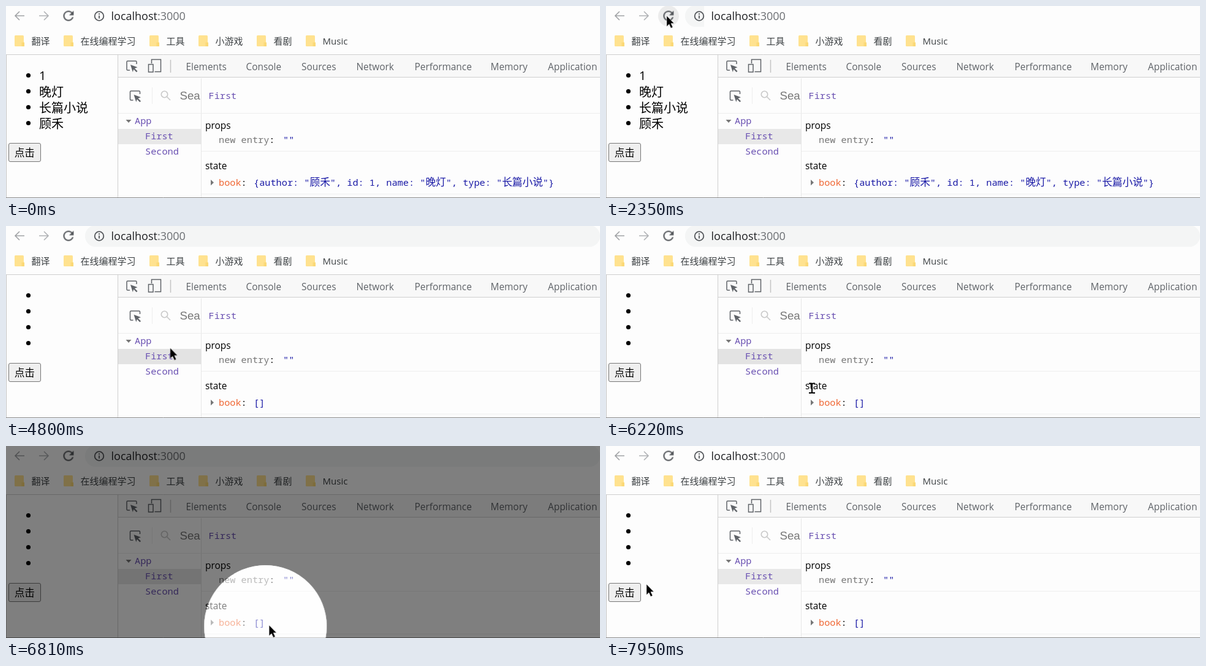
An HTML page for the animation above (8 s loop, 969x314 px).

```html
<!DOCTYPE html>
<html lang="zh-CN">
<head>
<meta charset="utf-8">
<title>State after reload</title>
<style>
html, body { margin: 0; width: 100%; height: 100%; overflow: hidden; background: #fdfdfd; }
svg { display: block; width: 969px; height: 314px; }
text { font-family: "Open Sans", "Noto Sans CJK SC", "Noto Sans CJK", sans-serif; white-space: pre; }
.url { font-size: 18px; fill: #202124; }
.dim { fill: #6b6e72; }
.marks { font-size: 15px; fill: #3c4043; }
.page { font-size: 20px; }
.tabs { font-size: 15.4px; fill: #5f6368; }
.head { font-size: 15.4px; }
.mono text { font-family: "Noto Sans Mono", "Noto Sans CJK SC", "Noto Sans CJK", monospace; font-size: 15.25px; }
.cjk { font-size: 16.67px; }
.tag { fill: #6a51b2; }
.key { fill: #ef6632; }
.val { fill: #1a1aa6; }
.line { fill: none; stroke-linecap: butt; }

.anim, .step { animation: 8s linear infinite; }
.step { animation-timing-function: step-end; }

#pill { animation-name: pill; }
@keyframes pill {
  0%, 88%, 100% { clip-path: inset(0 100% 0 0); }
  2% { clip-path: inset(0 809px 0 0); }
  34.625% { clip-path: inset(0 0 0 0); }
}
#hover { animation-name: hover; }
@keyframes hover {
  0%, 56.75%, 100% { opacity: 0; }
  2.875% { opacity: .5; }
  5.5% { opacity: 1; }
}
#tip { animation-name: tip; }
@keyframes tip {
  0%, 29.375%, 100% { opacity: 0; }
  9.25% { opacity: 1; }
}
#reload { animation-name: reload; }
@keyframes reload {
  0%, 54.375%, 100% { opacity: 1; }
  34.625% { opacity: 0; }
}
#stop { animation-name: stop; }
@keyframes stop {
  0%, 54.375%, 100% { opacity: 0; }
  34.625% { opacity: 1; }
  40.875% { opacity: .4; }
}
#items { animation-name: items; }
@keyframes items {
  0%, 100% { opacity: 1; }
  35%, 99.999% { opacity: 0; }
}
#full { animation-name: full; }
@keyframes full {
  0%, 100% { opacity: 1; }
  36.5%, 99.999% { opacity: 0; }
}
#empty { animation-name: empty; }
@keyframes empty {
  0%, 100% { opacity: 0; }
  36.5%, 99.999% { opacity: 1; }
}
#row { animation-name: row; }
@keyframes row {
  0%, 84%, 100% { fill: #e8e8e8; }
  59.5% { fill: #e3e3e3; }
}

.follow { animation-name: path; }
@keyframes path {
  0%, 2% { transform: translate(147px, 6px); }
  2.875%, 56.75% { transform: translate(99px, 16px); }
  58.25% { transform: translate(165px, 85px); }
  60% { transform: translate(267px, 199px); }
  62% { transform: translate(385px, 250px); }
  65%, 78.125% { transform: translate(336px, 265px); }
  84.75% { transform: translate(423px, 295px); }
  85.125% { transform: translate(429px, 293px); }
  87.625%, 88% { transform: translate(455px, 286px); }
  92.25% { transform: translate(328.500px, 282px); }
  92.625% { transform: translate(319.500px, 278px); }
  96.5%, 99.37% { transform: translate(84px, 236px); }
  99.375%, 100% { transform: translate(66px, 226px); }
}
#arrow { animation-name: arrow; }
@keyframes arrow {
  0%, 65%, 100% { opacity: 0; }
  2%, 78.5% { opacity: 1; }
}
#beam { animation-name: beam; }
@keyframes beam {
  0%, 78.5%, 100% { opacity: 0; }
  65% { opacity: 1; }
}

/* the spotlight trails the pointer by 30 ms */
#trail { animation-delay: -7970ms; }
#spot { animation-name: fade; }
@keyframes fade {
  0%, 78.125%, 96.875%, 100% { opacity: 0; }
  84%, 91.42% { opacity: .5; }
}
#lit { fill: #fff; animation-name: lit; }
@keyframes lit {
  0%, 78.125%, 96.875%, 100% { r: 900px; }
  84%, 91.42% { r: 100px; }
}
#dark { fill: none; stroke: #000; stroke-width: 3000px; animation-name: dark; }
@keyframes dark {
  0%, 78.125%, 96.875%, 100% { r: 2400px; }
  84%, 91.42% { r: 1600px; }
}
</style>
</head>
<body>
<svg viewBox="0 0 969 314">
  <defs>
    <g id="folder">
      <rect width="15" height="18" rx="1.5" fill="#ffe28f"/>
      <path d="M11.500 11.500h4.500v6.500h-4.500z" fill="#fbd977"/>
    </g>
    <g id="pick">
      <path class="line" d="M6 16H2.500Q1 16 1 14.500V2.500Q1 1 2.500 1H15.500Q17 1 17 2.500V6" stroke="#5f6368" stroke-width="1.5"/>
      <path d="M7 7l11.500 4.300-4.600 1.700 4.600 4.500-1.700 1.700-4.500-4.600-1.500 4.400z" fill="#5f6368"/>
    </g>
    <clipPath id="field"><rect x="183" y="118" width="134.500" height="57"/></clipPath>
  </defs>
  <rect width="969" height="314" fill="#fdfdfd"/>

  <!-- toolbar -->
  <rect id="pill" class="step" x="129" y="-1" width="840" height="35" rx="17" fill="#f4f5f5"/>
  <g class="line" stroke-width="1.6">
    <path d="M30 16H15M22 9l-7 7 7 7" stroke="#a0a2a5"/>
    <path d="M54 16h15M62 9l7 7-7 7" stroke="#b0b2b5"/>
  </g>
  <circle id="hover" class="step" cx="102" cy="16.500" r="17" fill="#ececec"/>
  <g id="reload" class="step">
    <path transform="translate(89.200 3.400) scale(1.06)" fill="#55585c" d="M17.650 6.350C16.200 4.900 14.210 4 12 4c-4.420 0-7.990 3.580-7.990 8s3.570 8 7.990 8c3.730 0 6.840-2.550 7.730-6h-2.080c-.82 2.330-3.040 4-5.650 4-3.310 0-6-2.690-6-6s2.690-6 6-6c1.660 0 3.140.69 4.220 1.780L13 11h7V4z"/>
  </g>
  <path id="stop" class="line step" d="M95.500 9.500l13 13m0-13l-13 13" stroke="#55585c" stroke-width="2"/>
  <circle class="line" cx="152" cy="16.500" r="7.300" stroke="#55585c" stroke-width="1.8"/>
  <path class="line" d="M152 12v2m0 1.500v5" stroke="#55585c" stroke-width="1.8"/>
  <text class="url" x="171.500" y="22.500">localhost<tspan class="dim">:3000</tspan></text>

  <!-- bookmarks -->
  <use href="#folder" x="14" y="48"/><use href="#folder" x="94" y="48"/>
  <use href="#folder" x="234" y="48"/><use href="#folder" x="314" y="48"/>
  <use href="#folder" x="409" y="48"/><use href="#folder" x="489" y="48"/>
  <g class="marks">
    <text x="41.500" y="63">翻译</text>
    <text x="121.500" y="63">在线编程学习</text>
    <text x="261.500" y="63">工具</text>
    <text x="341.500" y="63">小游戏</text>
    <text x="436.500" y="63">看剧</text>
    <text x="516.500" y="63">Music</text>
  </g>

  <!-- page -->
  <circle cx="36.500" cy="113.500" r="3.600"/><circle cx="36.500" cy="139.500" r="3.600"/>
  <circle cx="36.500" cy="165.500" r="3.600"/><circle cx="36.500" cy="191.500" r="3.600"/>
  <g id="items" class="page step">
    <text x="54" y="121">1</text>
    <text x="54" y="147.500">晚灯</text>
    <text x="54" y="173.500">长篇小说</text>
    <text x="54" y="199.500">顾禾</text>
  </g>
  <rect x="4.500" y="224.500" width="52" height="30" rx="2.500" fill="#efefef" stroke="#767676"/>
  <text class="cjk" x="13.700" y="246">点击</text>

  <!-- developer tools -->
  <rect x="183" y="80" width="786" height="37" fill="#f8f8f8"/>
  <g class="line">
    <path d="M0 79.500h969M183 116.500h786M182.500 80v233" stroke="#cfcfcf"/>
    <path d="M268.500 88v21" stroke="#c4c4c4" stroke-width="1.500"/>
    <path d="M318.500 118v195" stroke="#e6e6e6"/>
    <path d="M183 175.500h786M319 237.500h650M319 307.500h650M238.500 133v27" stroke="#eee"/>
    <path d="M.500 80v234" stroke="#c4c4c4"/>
    <path d="M0 313.500h969" stroke="#8a8a8a"/>
    <path d="M237.500 94v-6.500h15v20h-10M232.500 95.500h7.500v12.500h-7.500z" stroke="#5f6368" stroke-width="1.5"/>
    <g stroke="#c8c8c8" stroke-width="1.6">
      <circle cx="258.500" cy="144.500" r="5.200"/>
      <path d="M262.500 148.500l5.500 5.500"/>
    </g>
  </g>
  <use href="#pick" x="196" y="89"/>
  <use href="#pick" x="201.500" y="138"/>
  <g class="tabs">
    <text x="293.500" y="105">Elements</text>
    <text x="391.500" y="105">Console</text>
    <text x="482" y="105">Sources</text>
    <text x="571.500" y="105">Network</text>
    <text x="666.500" y="105">Performance</text>
    <text x="790.500" y="105">Memory</text>
    <text x="884" y="105">Application</text>
  </g>
  <g clip-path="url(#field)">
    <text x="283.500" y="153" style="font: 18.700px 'Liberation Sans', sans-serif" fill="#777">Sea</text>
  </g>
  <rect id="row" class="step" x="183" y="201" width="135" height="25" fill="#e8e8e8"/>
  <path d="M195.500 186h9l-4.500 5z" fill="#777"/>
  <path d="M334 284v9.500l5-4.750z" fill="#777"/>
  <text class="head" x="325" y="201">props</text>
  <text class="head" x="325" y="267">state</text>
  <g class="mono">
    <g class="tag">
      <text x="330.500" y="152">First</text>
      <text x="210" y="193">App</text>
      <text x="227" y="218">First</text>
      <text x="227" y="243">Second</text>
    </g>
    <text x="347" y="224" fill="#777">new entry<tspan fill="#000">:</tspan></text>
    <text class="val" x="452" y="224">""</text>
    <text class="key" x="347" y="294">book<tspan fill="#000">:</tspan></text>
    <g class="val">
      <text id="full" class="step" x="404" y="294">{author: "<tspan class="cjk">顾禾</tspan>", id: 1, name: "<tspan class="cjk">晚灯</tspan>", type: "<tspan class="cjk">长篇小说</tspan>"}</text>
      <text id="empty" class="step" x="404" y="294">[]</text>
    </g>
  </g>

  <g id="tip" class="step">
    <rect x="111.500" y="34.500" width="275" height="31" fill="#fff" stroke="#c4c4c4"/>
    <text x="121" y="55.500" font-size="15" fill="#575757">重新加载此页，按住即可查看更多选项</text>
  </g>

  <!-- pointer and spotlight -->
  <g id="spot" class="anim">
    <g id="trail" class="anim follow">
      <circle id="dark" class="anim" r="2400"/>
      <circle id="lit" class="anim" r="900"/>
    </g>
  </g>
  <g class="anim follow">
    <path id="arrow" class="step" d="M0 0V17.500l4-3.700 2.900 6.400 3.100-1.400-2.900-6.200h5z" stroke="#fff" stroke-width=".5"/>
    <path id="beam" class="line step" d="M-5-7.500h3.500q1.500 0 1.500 1.500 0-1.500 1.500-1.500h3.500M-5 8h3.500q1.500 0 1.500-1.500 0 1.500 1.500 1.500h3.500M0-6.500V7" stroke="#000" stroke-width="2"/>
  </g>
</svg>
</body>
</html>
```
